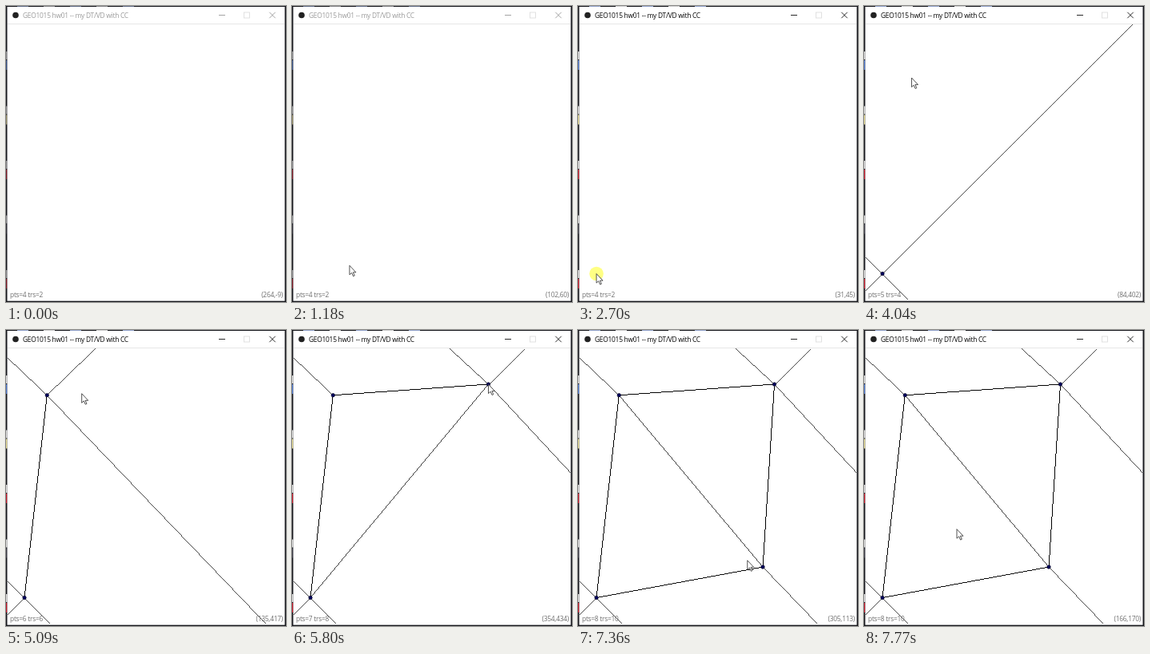
An HTML page for the animation above (8 s loop, 350 by 371 pixels).

```html
<!DOCTYPE html>
<html lang="en">
<head>
<meta charset="utf-8">
<title>Triangulation viewer</title>
<style>
  html, body { margin: 0; width: 100%; height: 100%; overflow: hidden; background: #fff; }
  svg { display: block; width: 100vw; height: 100vh; }
  text { font: 8.4px "Open Sans", "Noto Sans", sans-serif; letter-spacing: -.25px; }
  .status { fill: #707070; }
  line { stroke: #000; shape-rendering: crispEdges; }
  .dot { fill: #000060; stroke: #000020; stroke-width: .7; }
  .chrome { fill: none; stroke-width: .9; }
</style>
</head>
<body>
<svg viewBox="0 0 350 371" preserveAspectRatio="none">
  <defs><clipPath id="view"><rect x="2" y="23" width="346" height="345"/></clipPath></defs>
  <rect width="350" height="371" fill="#15161b"/>
  <g id="desktop"></g>
  <rect x="1.5" y="1" width="347" height="368.7" fill="#fff"/>
  <path d="M2 22.5H348" stroke="#e6e6e6"/>
  <circle cx="12" cy="11.5" r="3.8" fill="#222"/>
  <text id="title" x="21" y="14.8">GEO1015 hw01 -- my DT/VD with CC</text>
  <g class="chrome">
    <path id="buttons" d="M266 11.5H274M329.3 7.8L336.7 15.2M336.7 7.8L329.3 15.2"/>
    <rect x="297.5" y="8" width="7" height="7" stroke="#dedede"/>
  </g>
  <g id="canvas" clip-path="url(#view)"></g>
  <text id="count" class="status" x="5" y="365"></text>
  <text id="coord" class="status" x="346" y="365" text-anchor="end"></text>
  <circle id="click" r="8.8" fill="#ffff84"/>
  <path id="cursor" d="M0 0V11.6L2.6 9.2L4.6 13.5L6.3 12.7L4.4 8.6H8Z"
        fill="#fff" stroke="#333" stroke-width=".85"/>
</svg>
<script>
const LOOP = 8000;
const FAR = 10000;
const $ = id => document.getElementById(id);
const NS = "http://www.w3.org/2000/svg";

function add(parent, tag, attrs = {}) {
  const el = document.createElementNS(NS, tag);
  for (const k in attrs) el.setAttribute(k, attrs[k]);
  return parent.appendChild(el);
}
const show = (el, on) => el.setAttribute("visibility", on ? "visible" : "hidden");

// World coordinates, as in the status bar, to stage pixels
const toStage = ([x, y]) => [1.7 + x / 1.452, 366.5 - y / 1.454];

// Each click inserts one site when it is released.
const clicks = [
  { down: 2700, up: 2840, at: [31, 45] },
  { down: 4510, up: 4670, at: [72, 414] },
  { down: 5640, up: 5800, at: [354, 434] },
  { down: 6830, up: 6900, at: [333, 101] }
];

// Pointer strokes run in even steps from the end of the one before.
const strokes = [
  { from: 70, to: 70, steps: 1, at: [318, 67] },
  { from: 470, to: 710, steps: 4, at: [207, 59] },
  { from: 940, to: 1180, steps: 4, at: [102, 60] },
  { from: 1340, to: 1670, steps: 5, at: [37, 46] },
  { from: 1980, to: 2150, steps: 3, at: clicks[0].at },
  { from: 3480, to: 3730, steps: 4, at: [97, 384] },
  { from: 3980, to: 4040, steps: 2, at: [84, 402] },
  { from: 4130, to: 4210, steps: 2, at: clicks[1].at },
  { from: 5090, to: 5090, steps: 1, at: [135, 417] },
  { from: 5170, to: 5340, steps: 3, at: clicks[2].at },
  { from: 6190, to: 6420, steps: 4, at: clicks[3].at },
  { from: 7360, to: 7770, steps: 6, at: [166, 170] }
];

function pointer(t) {
  const i = strokes.findLastIndex(s => s.from <= t);
  if (i < 0) return null;
  const { from, to, steps, at } = strokes[i];
  const start = i ? strokes[i - 1].at : at;
  const gap = (to - from) / (steps - 1) || 1;
  const f = Math.min(steps, 1 + Math.floor((t - from) / gap + .05)) / steps;
  return start.map((v, k) => Math.round(v + (at[k] - v) * f));
}

// True when s lies inside the circle through p, q and r
function inCircle(p, q, r, s) {
  const [a, b, c] = [p, q, r].map(([x, y]) => [x - s[0], y - s[1]]);
  const cross = (u, v) => u[0] * v[1] - u[1] * v[0];
  const sq = u => u[0] * u[0] + u[1] * u[1];
  const det = sq(a) * cross(b, c) + sq(b) * cross(c, a) + sq(c) * cross(a, b);
  return det * (cross(a, b) + cross(b, c) + cross(c, a)) > 0;
}

// Delaunay edges: all sides of triangles whose circle is empty
function delaunay(pts) {
  const edges = new Set();
  for (let i = 0; i < pts.length; i++)
    for (let j = i + 1; j < pts.length; j++)
      for (let k = j + 1; k < pts.length; k++) {
        const clash = (p, n) => n !== i && n !== j && n !== k && inCircle(pts[i], pts[j], pts[k], p);
        if (!pts.some(clash)) [[i, j], [j, k], [i, k]].forEach(e => edges.add(e.join()));
      }
  return [...edges].map(e => e.split(",").map(n => pts[n]));
}

function addEdge(parent, [p, q]) {
  const [x1, y1] = toStage(p), [x2, y2] = toStage(q);
  const dx = Math.abs(x2 - x1), dy = Math.abs(y2 - y1);
  // This width covers one pixel per row or column.
  add(parent, "line", { x1, y1, x2, y2, "stroke-width": Math.max(dx, dy) / Math.hypot(dx, dy) });
}

const corners = [[-FAR, -FAR], [FAR, -FAR], [FAR, FAR], [-FAR, FAR]];
const sites = clicks.map(c => c.at);
const meshes = sites.map((_, i) => {
  const g = add($("canvas"), "g");
  const shown = sites.slice(0, i + 1);
  delaunay([...corners, ...shown]).forEach(e => addEdge(g, e));
  for (const [cx, cy] of shown.map(toStage)) add(g, "circle", { class: "dot", cx, cy, r: 2.2 });
  return g;
});

// Slivers of the desktop beside the window
const patch = (x, y, width, height, fill) => add($("desktop"), "rect", { x, y, width, height, fill });
["#4a74c8", "#e0d690", "#c01828", "#3a3a44", "#c01828"].forEach((tint, i) => {
  const y = 57 + 68.5 * i;
  patch(0, y, 1.5, 10, "#d8d8d8");
  patch(0, y + 11, 1.5, 12, tint);
});
for (let i = 0; i < 5; i++) patch(14 + 33 * i, 0, 14, 1, i % 2 ? "#ccc" : "#8fa0c8");

function draw(t) {
  const active = t >= clicks[0].down;
  $("title").setAttribute("fill", active ? "#000" : "#999");
  $("buttons").setAttribute("stroke", active ? "#111" : "#999");
  $("desktop").setAttribute("opacity", active ? 1 : .6);

  const n = clicks.filter(c => c.up <= t).length;
  meshes.forEach((g, i) => show(g, i === n - 1));
  $("count").textContent = `pts=${4 + n} trs=${2 + 2 * n}`;

  const at = pointer(t);
  show($("cursor"), at);
  if (at) $("cursor").setAttribute("transform", `translate(${toStage(at)})`);
  $("coord").textContent = `(${t < strokes[1].from ? "264,-9" : at})`;

  const click = clicks.find(c => t >= c.down && t < c.up);
  show($("click"), click);
  if (click) $("click").setAttribute("transform", `translate(${toStage(click.at)})`);
}

const start = performance.now();
function tick() {
  draw((performance.now() - start) % LOOP);
  requestAnimationFrame(tick);
}
tick();
</script>
</body>
</html>
```
